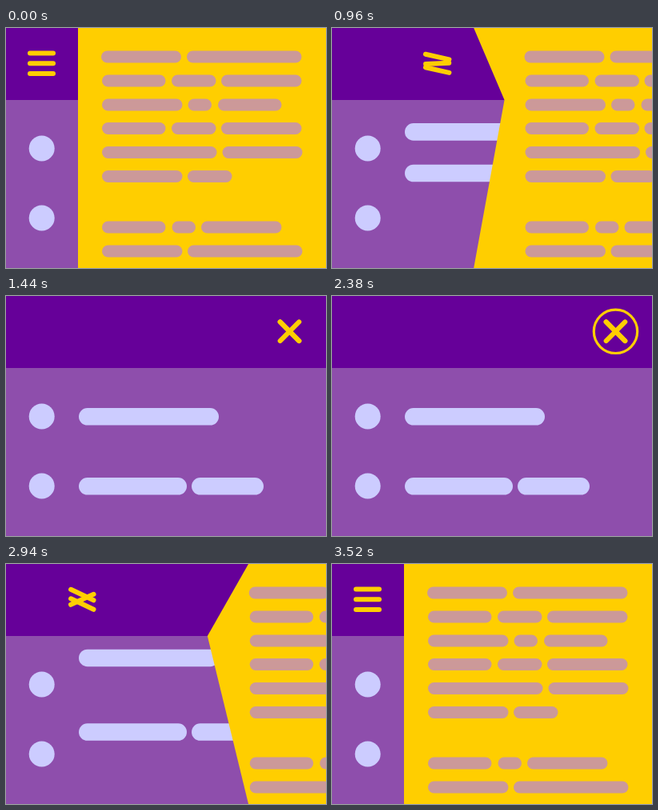
An HTML page for the animation above (4320 ms loop, 400 px wide and 300 px high).

```html
<!DOCTYPE html>
<html lang="en">
<head>
<meta charset="utf-8">
<title>Sliding menu</title>
<style>
  html, body { margin: 0; width: 100%; height: 100%; overflow: hidden; }
  svg { display: block; width: 100vw; height: 100vh; }
</style>
</head>
<body>
<svg id="stage" viewBox="0 0 400 300">
  <rect width="400" height="300" fill="#8e4eac"/>
  <g id="items" fill="#ccccff">
    <circle cx="44.7" cy="150.5" r="16"/>
    <circle cx="44.7" cy="237.5" r="16"/>
    <g id="label1">
      <rect x="91" y="140" width="175" height="21.6" rx="10.8"/>
    </g>
    <g id="label2">
      <rect x="91" y="227" width="135" height="21.6" rx="10.8"/>
      <rect x="232" y="227" width="90" height="21.6" rx="10.8"/>
    </g>
  </g>
  <rect width="400" height="90" fill="#660099"/>
  <polygon id="page" fill="#ffce00"/>
  <g id="text" fill="#cc9999"></g>
  <g id="icon" fill="none" stroke="#ffce00" stroke-linecap="round">
    <circle id="ring" stroke-width="3.2"/>
    <line id="top" stroke-width="6"/>
    <line id="middle" stroke-width="6"/>
    <line id="bottom" stroke-width="6"/>
  </g>
</svg>
<script>
const LOOP = 4320, OPEN_AT = 500, CLOSE_AT = 2380, STEP = 32.4;
const TRAVEL = 310, GAP = 12.75;
const byId = id => document.getElementById(id);
const set = (id, attrs) => {
  for (const name in attrs) byId(id).setAttribute(name, attrs[name]);
};

// Each row: centre y, then x and width of every word.
const ROWS = [
  [36, 119, 100, 226, 143.5],
  [66, 120, 79.5, 207, 55.5, 269, 100.5],
  [96, 120, 100.5, 227.5, 29.5, 265, 79.5],
  [125.5, 120, 79.5, 207, 55.5, 269, 100.5],
  [155.5, 120, 143.5, 270.5, 100],
  [185.5, 120, 100.5, 227, 55.5],
  [249, 120, 79.5, 207.5, 29.5, 244, 100.5],
  [279, 120, 100.5, 227, 143.5]
];
byId("text").innerHTML = ROWS.map(([y, ...words]) => {
  let row = "";
  for (let i = 0; i < words.length; i += 2)
    row += `<rect x="${words[i]}" y="${y - 7.5}" width="${words[i + 1]}" height="15" rx="7.5"/>`;
  return row;
}).join("");

const ease = p => p < 0.5 ? 2 * p * p : 1 - 2 * (1 - p) ** 2;

// Eased track through [step, value] keys; power < 1 gives a quicker start.
function track(k, keys, power = 1) {
  if (k <= keys[0][0]) return keys[0][1];
  for (let i = 1; i < keys.length; i++) {
    const [k0, v0] = keys[i - 1], [k1, v1] = keys[i];
    if (k < k1) return v0 + (v1 - v0) * ease(((k - k0) / (k1 - k0)) ** power);
  }
  return keys[keys.length - 1][1];
}

const opening = k => {
  const edge = track(k, [[5, 0], [29, TRAVEL]]);
  return {
    edge, icon: edge,
    fold: track(k, [[5, 0], [25, TRAVEL]]),
    text: track(k, [[5, 0], [25, 300]]),
    label1: track(k, [[5, -60], [21.4, 6], [26, 0]]),
    label2: track(k, [[5, -147], [21.4, 6], [26, 0]]),
    outer: track(k, [[5, 0], [29, 45]]),
    inner: track(k, [[11, 0], [29, -45]]),
    spread: track(k, [[5, GAP], [26.4, 0]])
  };
};

const closing = k => ({
  edge: track(k, [[10, TRAVEL], [27.7, 0]]),
  icon: track(k, [[5, TRAVEL], [25, 0]], 0.66),
  fold: track(k, [[6, TRAVEL], [28.5, 0]]),
  text: track(k, [[7, 300], [30.3, -13], [35, 0]]),
  label1: track(k, [[4, 0], [12, 6], [21, -59]]),
  label2: track(k, [[6, 0], [14, 6], [23, -146]]),
  outer: track(k, [[5, 45], [11, 49], [24, -6.5], [31, 0]]),
  inner: track(k, [[5, -45], [11, -49], [23, 0]]),
  spread: track(k, [[12, 0], [24, 16.5], [31, GAP]])
});

function drawStroke(id, dy, angle) {
  const half = 14.5 + 2.2 * Math.min(1, Math.abs(angle) / 45);
  set(id, { x1: -half, x2: half, transform: `translate(0 ${dy}) rotate(${angle})` });
}

function draw(t) {
  const isClosing = t >= CLOSE_AT;
  const k = Math.floor((t - (isClosing ? CLOSE_AT : OPEN_AT)) / STEP);
  const s = (isClosing ? closing : opening)(k);
  const edge = 90 + s.edge, fold = 90 + s.fold;

  set("page", { points: `${edge},0 ${fold},90 ${edge},300 720,300 720,0` });
  set("text", { transform: `translate(${s.text} 0)` });
  set("label1", { transform: `translate(0 ${s.label1})` });
  set("label2", { transform: `translate(0 ${s.label2})` });
  set("icon", { transform: `translate(${44.5 + s.icon} 44.3)` });
  drawStroke("top", -s.spread, s.outer);
  drawStroke("middle", 0, s.inner);
  drawStroke("bottom", s.spread, s.outer);

  const pressed = k >= 0 && k < 5;
  set("ring", { r: pressed ? 27.2 + 5 * k : 0, opacity: pressed ? 1 - k / 5 : 0 });
}

const start = performance.now();
function tick() {
  draw((performance.now() - start) % LOOP);
  requestAnimationFrame(tick);
}
tick();
</script>
</body>
</html>
```
